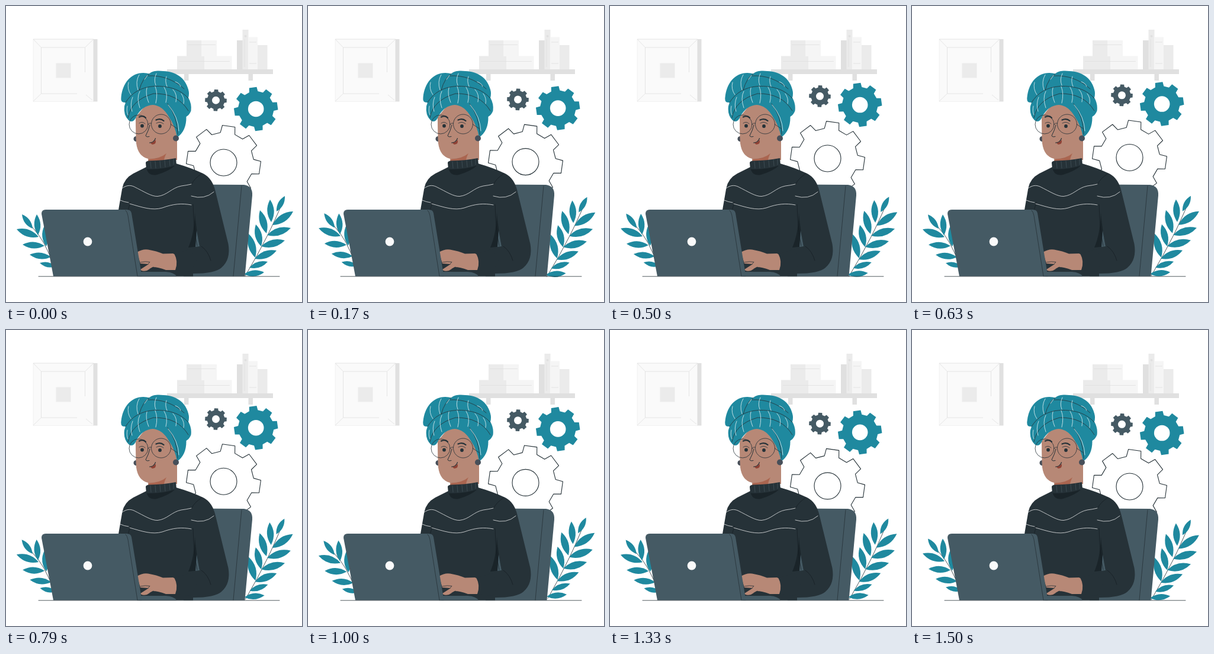
Animation of 500x500 px, one loop 1.54 s. Source, as an HTML page:

```html
<!DOCTYPE html>
<html lang="en">
<head>
<meta charset="utf-8">
<title>Working at a laptop</title>
<style>
  html, body { margin: 0; width: 100%; height: 100%; overflow: hidden; background: #fff; }
  svg { display: block; width: 100vw; height: 100vh; }
  .teal { fill: #1f899f; }
  .slate { fill: #455a64; }
  .dark { fill: #263238; }
  .skin { fill: #b78876; }
  .line { fill: none; stroke: #263238; stroke-width: .8; stroke-linecap: round; stroke-linejoin: round; }
  .white { fill: none; stroke: #fff; stroke-width: .7; stroke-linecap: round; }
  .pale { fill: none; stroke: #e0e0e0; stroke-width: .8; }
</style>
</head>
<body>
<svg viewBox="0 0 500 500">
  <g id="picture">
    <path fill="#fafafa" d="M46 56H148V161.500H46Z"/>
    <path fill="#e0e0e0" d="M147.500 56H154.500V161.500H147.500Z"/>
    <path fill="#ebebeb" d="M84.500 96.500H109.500V121.500H84.500Z"/>
    <path class="pale" d="M46 56H148M46 56L59.500 70H133.500V112M148 56L133.500 70M59.500 70V148H120M46 161L59.500 148M146 159L135 150"/>
    <path class="pale" stroke-opacity=".5" d="M46 56V161.500H148"/>
  </g>

  <g id="shelf">
    <path fill="#e0e0e0" d="M272 107H451V115H272ZM301 115H308.500V126H301ZM409.500 115H417V126H409.500ZM390 58H400V107H390Z"/>
    <path fill="#ebebeb" d="M305 58H330V85H305ZM289 84.500H335V107H289ZM399.500 40H409.500V107H399.500ZM425 66H441.500V107H425Z"/>
    <path fill="#f5f5f5" d="M330 58H356V84.500H330ZM335 84.500H381.500V107H335ZM409.500 52.500H425V107H409.500Z"/>
    <path class="pale" d="M307 65.500H354M292 93.500H378M403 55V103M411 61H423M411 97H423"/>
    <circle cx="404.500" cy="51" r="2" fill="#e0e0e0"/>
  </g>

  <g id="gears"></g>
  <g id="plants">
    <path class="line" d="M404 456Q425 421 442 387Q453 365 468 330M33 362Q59 386 71 415L86 448"/>
  </g>

  <g id="chair">
    <path class="slate" d="M320 301.500L402 302Q417 304 416 320L403.500 456.500H300Z"/>
    <path class="line" d="M398 304L384 456"/>
  </g>

  <g id="body">
    <path class="dark" d="M237 272L215 283Q200 291 196.500 307L189 350L222 456.500H316V452Q353 452 364 442Q380 428 375.500 402L354 314Q349 291 333 283Q312 273 287 266Z"/>
    <path fill="#1a2429" d="M319 350Q318 385 308 408L327 406Q321 375 319 350Z"/>
    <path class="slate" d="M322 379L320 407L327 406Z"/>
    <path fill="#1a2429" d="M237 273Q240 288 255 285Q275 279 285 270Z"/>
    <path class="line" stroke-opacity=".7" style="stroke:#11191d" d="M331 283Q318 291 313 302M316 335Q317 380 323 405M330 406Q341 413 346 430M210 331L206 346"/>
    <path class="white" d="M196 308C203 303 209 302 216 305C234 314 246 322 256 321.500C272 320 280 307 296 304Q304 303 313 301M313 321Q335 328 351 314M193 328Q199 331 207 332M209 334C230 340 247 346 264 341C283 334 297 333 313 336"/>
  </g>

  <g id="head">
    <circle cx="220" cy="224.500" r="4.500" fill="#474f59"/>
    <path class="skin" d="M219 188Q219 215 220 232Q223 254 240 258L240 264L289 260L289 205L276 165L240 162Z"/>
    <path fill="#aa6550" d="M242 258.500Q260 258 271 249Q267 256 267 262L240 264Z"/>
    <path class="dark" d="M236 265Q236 262 241 261.500Q266 261 287 257L288 268.500Q264 277 237 275.500Z"/>
    <path class="line" style="stroke:#53646c;stroke-width:.5" d="M244 263L245 274M252 262.500L253 274M260 262L261 273M268 261L269 272M276 260L277 270M283 259L283 268"/>

    <path class="teal" d="M202 163Q193 164 194.500 154C197 130 211 113 232 113Q238 113 242 114.500C247 109 258 109 266 110C288 111 303 122 308 141Q310 148 308 155Q314 165 312.500 177Q310 184 304.500 187Q305 211 289 222Q286 203 275 187Q264 168 248 167Q230 168 220 187Q215 199 207 193Q198 184 200 169Z"/>
    <path class="line" d="M202 163Q217 138 250 135.500Q289 134 308 156M242 114.500Q231 121 225 142M240 118Q274 116 301 140M206 189Q211 159 249 148Q290 147 308 177M273 165Q290 187 290 217"/>
    <path class="white" d="M225 116Q218 128 223 142M207 129Q204 140 211 150M239 117L234 124M254 114Q249 124 253 134M271 119Q268 127 272 136M286 128Q293 130 295 136M226 144Q220 155 226 172M238 138Q235 149 241 163M252 136Q257 148 253 164M267 137Q274 148 270 163M282 141Q290 149 287 162M296 148Q302 156 300 165M214 154Q209 166 213 178M205 169Q203 178 206 184M274 167Q291 187 292 211"/>

    <circle cx="287" cy="223.500" r="5" fill="#474f59"/>
    <g class="line">
      <circle cx="224" cy="200" r="16"/>
      <circle cx="262" cy="199.500" r="16.500"/>
      <path d="M240 200Q242 197 245.500 198M278.500 200L289 207M225 198Q230 194 235 199M254 198Q260 194 266 199"/>
      <path stroke-width="1" d="M243 201Q241 210 236 219Q237 222 242 220.500"/>
      <path style="stroke-width:2.200" d="M225 187.500Q232 184 236 189M253.500 192.500Q261 189 266.500 194"/>
      <path style="stroke-width:1.100" d="M242.500 231Q250 231 252.500 223.500"/>
    </g>
    <path fill="#8f4235" d="M244 231.500Q250 230 252.500 226Q255 233 247 234Z"/>
    <circle class="dark" cx="230" cy="202.500" r="2.900"/>
    <circle class="dark" cx="260" cy="203" r="2.900"/>
  </g>

  <g id="laptop">
    <path class="slate" d="M225 449H270Q284 450 288 456.500H225Z"/>
    <path class="skin" d="M221 416Q231 410 240 411.500Q255 414 265 418.500L284 418Q291 431 287 446L270 446Q257 441 248 441L238 447Q229 449 227 445L241 436L227 435Z"/>
    <path class="line" d="M227 433Q236 431 243 432.500L240 436M249 441L243 444"/>
    <path class="dark" d="M282 418Q300 416 310 409L322 430L312 449L286 446Q291 431 286 420Z"/>
    <path class="slate" d="M60 351Q60 344 67 344H204Q211 344 212 350L229.500 456.500H80Z"/>
    <path class="line" d="M202 345Q205 348 206 354L222 456"/>
    <circle cx="138" cy="398" r="7.400" fill="#fafafa"/>
  </g>
  <path class="line" d="M55 456.800H462"/>
</svg>

<script>
const PERIOD = 1540;
const gears = document.getElementById('gears');
const plants = document.getElementById('plants');

function add(parent, tag, attributes) {
  const node = document.createElementNS('http://www.w3.org/2000/svg', tag);
  for (const name in attributes) node.setAttribute(name, attributes[name]);
  parent.append(node);
}

function gear(x, y, radius, hole, turn, style) {
  const points = [];
  const corners = [[-14, .81], [-9.8, 1], [9.8, 1], [14, .81]];
  for (let tooth = 0; tooth < 8; tooth++) {
    for (const [offset, scale] of corners) {
      const angle = (turn + tooth * 45 + offset) * Math.PI / 180;
      points.push([x + radius * scale * Math.cos(angle), y + radius * scale * Math.sin(angle)]);
    }
  }
  add(gears, 'polygon', { points: points.join(' '), style });
  add(gears, 'circle', { cx: x, cy: y, r: hole, style: style.includes('stroke') ? style : 'fill:#fff' });
}

function leaf(x, y, tipX, tipY) {
  const dx = (tipX - x) * .3, dy = (tipY - y) * .3;
  const midX = (x + tipX) / 2, midY = (y + tipY) / 2;
  add(plants, 'path', {
    class: 'teal',
    d: `M${x} ${y}Q${midX - dy} ${midY + dx} ${tipX} ${tipY}Q${midX + dy} ${midY - dx} ${x} ${y}`
  });
}

gear(354.5, 159.3, 18.5, 6.5, 2, 'fill:#455a64');
gear(422.2, 174, 37.3, 13.3, -8, 'fill:#1f899f');
gear(367.5, 264.5, 63, 22.5, 8, 'fill:#fff;stroke:#263238;stroke-width:1.1;stroke-linejoin:round');

[
  [457, 347, 471, 321], [448, 365, 446, 327], [440, 384, 429, 345],
  [431, 406, 422, 369], [421, 425, 410, 385], [450, 370, 485, 347],
  [441, 387, 481, 375], [431, 406, 471, 396], [420, 427, 457, 413],
  [411, 442, 442, 432], [402, 453, 436, 450],
  [45, 376, 27, 352], [55, 390, 18, 377], [65, 405, 28, 403],
  [76, 424, 40, 420], [84, 440, 57, 434], [54, 387, 52, 352], [68, 406, 65, 371]
].forEach(place => leaf(...place));

function draw(now) {
  const wave = shift => 2 * Math.PI * (now + shift) / PERIOD;
  const lift = 4.45 * (Math.cos(wave(30)) - 1);
  const sway = .8 * (Math.sin(wave(80)) - .32);
  gears.setAttribute('transform', `translate(0 ${lift})`);
  plants.setAttribute('transform', `rotate(${sway} 251 389)`);
}

const start = performance.now();
function tick() {
  draw((performance.now() - start) % PERIOD);
  requestAnimationFrame(tick);
}
tick();
</script>
</body>
</html>
```
